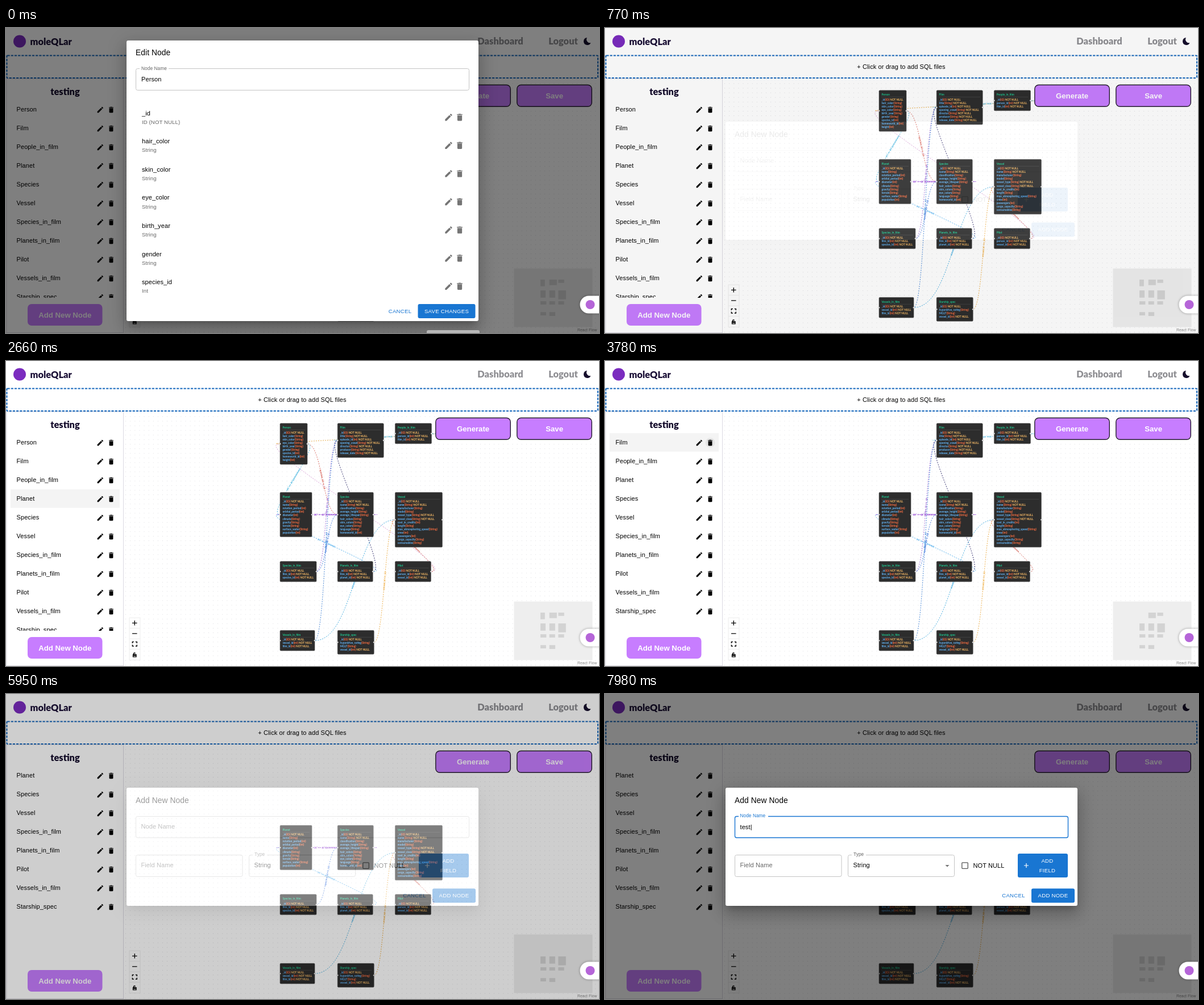
Animation of 1043 by 537 pixels, one loop 8 s. Source, as an HTML page:

```html
<!DOCTYPE html>
<html lang="en">
<head>
<meta charset="utf-8">
<title>Schema editor</title>
<style>
  html, body { margin: 0; width: 100%; height: 100%; overflow: hidden; background: #fff; }
  svg, .modal, .backdrop { position: absolute; left: 0; top: 0; width: 1043px; height: 537px; }
  svg { font: 11px "Liberation Sans", Arial, sans-serif; letter-spacing: .1px; }
  .backdrop { background: rgba(0, 0, 0, .5); }
  .paper { position: absolute; left: 212px; width: 619px; background: #fff; border-radius: 3px;
    box-shadow: 0 8px 10px -5px rgba(0,0,0,.2), 0 16px 26px 2px rgba(0,0,0,.14), 0 6px 32px 6px rgba(0,0,0,.12); }
  .brand { font: 900 16.4px Lato, sans-serif; letter-spacing: 0; }
  .bold { font-weight: 700; font-size: 13.2px; letter-spacing: 0; text-anchor: middle; fill: #fff; }
  .title { font-size: 13.75px; }
  .small { font-size: 9.6px; fill: #666; }
  .label { font-size: 8.25px; fill: #666; }
  .caps { font-size: 9.6px; letter-spacing: .27px; text-anchor: middle; }
  .graph { font: 700 4.75px Lato, sans-serif; letter-spacing: 0; }
  .edge { fill: none; stroke-width: 1; stroke-dasharray: 2.025; }
  .box { fill: none; stroke: #c4c4c4; }
</style>
</head>
<body>
<svg id="base"></svg>
<div class="modal" id="edit"><div class="backdrop"></div><div class="paper" style="top:22px;height:494px"></div><svg></svg></div>
<div class="modal" id="add"><div class="backdrop"></div><div class="paper" style="top:165px;height:208px"></div><svg></svg></div>
<svg id="badge"></svg>
<script>
const LOOP = 8000, STEP = 70, ZOOM = .405;
const BLUE = '#1976d2', VIOLET = '#c77dff';
const $ = selector => document.querySelector(selector);

const text = (x, y, s, cls = '', more = '') => `<text x="${x}" y="${y}" class="${cls}" ${more}>${s}</text>`;
const rect = (x, y, w, h, more = '') => `<rect x="${x}" y="${y}" width="${w}" height="${h}" ${more}/>`;
const icon = (d, x, y, size) => `<path d="${d}" transform="translate(${x - size / 2} ${y - size / 2}) scale(${size / 24})"/>`;
const PENCIL = 'M3 17.25V21h3.75L17.81 9.94l-3.75-3.75zM20.71 7.04a1 1 0 0 0 0-1.41l-2.34-2.34a1 1 0 0 0-1.41 0l-1.83 1.83 3.75 3.75z';
const TRASH = 'M6 19c0 1.1.9 2 2 2h8c1.1 0 2-.9 2-2V7H6zM19 4h-3.5l-1-1h-5l-1 1H5v2h14z';
const tools = (x, y, size, gap) => icon(PENCIL, x, y, size) + icon(TRASH, x + gap, y, size);

// Fields: "#" marks Int, "!" marks NOT NULL, otherwise a nullable String.
const nodes = [
  ['Person', 48, 'hair_color skin_color eye_color birth_year gender species_id# homeworld_id# height#'],
  ['Film', 81, 'title! episode_id#! opening_crawl! director! producer! release_date!'],
  ['People_in_film', 64, 'person_id#! film_id#!'],
  ['Planet', 56, 'name rotation_period# orbital_period# diameter# climate gravity terrain surface_water population#'],
  ['Species', 63, 'name! classification average_height average_lifespan hair_colors skin_colors eye_colors language homeworld_id#'],
  ['Vessel', 83, 'name! manufacturer model vessel_type! vessel_class! cost_in_credits# length max_atmosphering_speed crew# passengers# cargo_capacity consumables'],
  ['Species_in_film', 64, 'film_id#! species_id#!'],
  ['Planets_in_film', 62, 'film_id#! planet_id#!'],
  ['Pilot', 63, 'person_id#! vessel_id#!'],
  ['Vessels_in_film', 61, 'vessel_id#! film_id#!'],
  ['Starship_spec', 64, 'hyperdrive_rating MGLT vessel_id#!']
].map(([name, w, list], i) => {
  const fields = ['_id!', ...list.split(' ')];
  return { name, w, fields, x: 482 + i % 3 * 101.2, y: 109.8 + Math.floor(i / 3) * 121.5, h: 17.6 + 6.07 * fields.length };
});
const byName = Object.fromEntries(nodes.map(n => [n.name, n]));

const edges = [
  ['Person', 'Species', '#d9695f', 'species_id'],
  ['Person', 'Planet', '#4db8e0', 'homeworld_id'],
  ['People_in_film', 'Person', '#e9b04f', 'person_id'],
  ['People_in_film', 'Film', '#6cc3e6', 'film_id'],
  ['Species', 'Planet', '#9b51d6', 'homeworld_id'],
  ['Species_in_film', 'Film', '#a274d8', 'film_id'],
  ['Species_in_film', 'Species', '#4a7fe0', 'species_id'],
  ['Planets_in_film', 'Film', '#34306e', 'film_id'],
  ['Planets_in_film', 'Planet', '#5db4ee', 'planet_id'],
  ['Pilot', 'Person', '#d9a0d6', 'person_id'],
  ['Pilot', 'Vessel', '#d4665c', 'vessel_id'],
  ['Vessels_in_film', 'Film', '#4c8ad8', 'film_id'],
  ['Vessels_in_film', 'Vessel', '#45ade0', 'vessel_id'],
  ['Starship_spec', 'Vessel', '#efb04a', 'vessel_id']
];

function edgeSvg([from, to, color, field], i) {
  const a = byName[from], b = byName[to];
  const x1 = a.x + a.w, y1 = a.y + a.h / 2, x2 = b.x, y2 = b.y + b.h / 2, d = x2 - x1;
  const bend = d >= 0 ? d / 2 : 6.25 * Math.sqrt(-d * ZOOM);
  return `<path id="e${i}" class="edge" stroke="${color}" d="M${x1} ${y1}C${x1 + bend} ${y1} ${x2 - bend} ${y2} ${x2} ${y2}"/>
    <text fill="${color}" dy="1.5" text-anchor="middle"><textPath href="#e${i}" startOffset="50%">${field} → _id</textPath></text>`;
}

function fieldSvg(field, x, y) {
  const name = field.replace(/[#!]/g, '');
  const type = name === '_id' ? 'ID' : field.includes('#') ? 'Int' : 'String';
  const required = field.includes('!') ? '<tspan fill="#ffc069"> NOT NULL</tspan>' : '';
  return text(x, y, `${name}<tspan fill="#ff7043">(${type})</tspan>${required}`, '', 'fill="#64b5f6"');
}

function nodeSvg({ name, x, y, w, h, fields }) {
  const dot = cx => `<circle cx="${cx}" cy="${y + h / 2}" r="1.3" fill="#fff" stroke="#777" stroke-width=".4"/>`;
  return rect(x, y, w, h, 'rx="1.5" fill="#2d2d2d" stroke="#555" stroke-width=".6"') +
    text(x + 4.4, y + 9.2, name, '', 'fill="#1fc58e"') +
    rect(x + 4, y + 11.6, w - 8, .5, 'fill="#555"') +
    fields.map((f, i) => fieldSvg(f, x + 4.4, y + 17.9 + i * 6.07)).join('') + dot(x) + dot(x + w);
}

const miniSvg = n => rect(940 + (n.x - 482) * .155, 443 + (n.y - 110) * .157, n.w * .162, n.h * .162, 'fill="#d3d3d3"');
const rowSvg = (n, i) => text(18.5, 147.3 + i * 33, n.name) + tools(165.8, 144 + i * 33, 13.75, 19.2);
const button = (x, y, s, border) => rect(x, y, 131.5, 38, `rx="7" fill="${VIOLET}" ${border}`) + text(x + 65.8, y + 23.5, s, 'bold');

const controls = [
  'M222 461.3h8.5M226.3 457v8.5', 'M222 479.8h8.5',
  'M222.3 497v-2.5h2.5M227.8 494.5h2.5v2.5M230.3 499.500v2.5h-2.5M224.8 502h-2.500v-2.500',
  'M223.500 517h5.500v3.800h-5.500zM224.500 517v-2q1.500-2 3 0M223.500 518.500h5.500'
];

$('#base').innerHTML = `
  <defs>
    <pattern id="dots" x="482" y="110" width="8.1" height="8.1" patternUnits="userSpaceOnUse"><circle cx="4" cy="4" r=".5" fill="#cfcfd4"/></pattern>
    <clipPath id="listClip">${rect(0, 120, 206, 355)}</clipPath>
  </defs>
  ${rect(0, 0, 1043, 537, 'fill="#fff"')}${rect(207, 89, 836, 448, 'fill="url(#dots)"')}
  <g id="graph" class="graph"></g>
  ${rect(1, 89.500, 205.500, 447, 'fill="#fff" stroke="#dcdae2"')}
  <circle cx="24" cy="23.500" r="11" fill="#7b2cbf"/>
  ${text(42.500, 29.500, 'moleQLar', 'brand', 'fill="#1d1238"')}
  ${text(869.500, 29.200, 'Dashboard', 'brand', 'fill="#8e8e92" text-anchor="middle"')}
  ${text(980, 29.200, 'Logout', 'brand', 'fill="#8e8e92" text-anchor="middle"')}
  <path d="M1022 17a6.500 6.500 0 1 0 6.500 9a6 6 0 0 1-6.500-9z" fill="#150c2c"/>
  ${rect(1.500, 48.500, 1039.500, 39.500, 'rx="1" fill="#fff" stroke="#1769bd" stroke-width="2" stroke-dasharray="4.200 2"')}
  ${text(521, 71.800, '+ Click or drag to add SQL files', '', 'text-anchor="middle"')}
  ${text(104, 118, 'testing', 'brand', 'fill="#150c2c" text-anchor="middle"')}
  <g id="hover">${rect(8, 127, 192, 32.500, 'fill="#f4f4f4"')}<circle id="trashHover" cx="185" cy="143.800" r="8.500" fill="#e6e6e6"/></g>
  <g id="list" clip-path="url(#listClip)"></g>
  ${button(38, 486, 'Add New Node', '')}
  ${button(755.800, 100.200, 'Generate', 'stroke="#26202e" stroke-width="1.400"')}
  ${button(898.800, 100.200, 'Save', 'stroke="#26202e" stroke-width="1.400"')}
  ${rect(217, 452, 19, 74.500, 'fill="#fefefe" stroke="#eee"')}
  <path d="M217 470.500h19M217 489h19M217 507.500h19" stroke="#eee"/>
  <path d="${controls.join('')}" fill="none" stroke="#000" stroke-width="1.300"/>
  ${rect(893.500, 423.500, 138, 103, 'fill="#eee"')}
  <g id="mini"></g>
  ${text(1039.500, 533.500, 'React Flow', '', 'font-size="6.900" letter-spacing="0" fill="#888" text-anchor="end"')}`;

$('#edit svg').innerHTML = text(228, 48.200, 'Edit Node', 'title') +
  rect(228.500, 71.500, 586, 38, 'rx="3" class="box"') + rect(235, 69, 51, 5, 'fill="#fff"') +
  text(238, 73.600, 'Node Name', 'label') + text(238, 94.300, 'Person') +
  nodes[0].fields.slice(0, 7).map((f, i) => {
    const y = 153.500 + i * 49.600;
    const type = i === 0 ? 'ID (NOT NULL)' : f.includes('#') ? 'Int' : 'String';
    return text(239, y, f.replace(/[#!]/g, '')) + text(239, y + 15.200, type, 'small') +
      `<g fill="#757575">${tools(778.500, y + 3.700, 16.500, 19.500)}</g>`;
  }).join('') +
  text(693, 502, 'CANCEL', 'caps', `fill="${BLUE}"`) +
  rect(724.500, 486, 101, 25, `rx="3" fill="${BLUE}"`) + text(775, 502, 'SAVE CHANGES', 'caps', 'fill="#fff"') +
  rect(740, 532, 93, 8, 'rx="3" fill="#b8b8b8"');

$('#add svg').innerHTML = text(228, 191.500, 'Add New Node', 'title') +
  rect(228.500, 215.500, 586, 37.500, 'id="nameBox" rx="3" class="box"') +
  rect(235, 213, 52, 5, 'id="notch" fill="#fff"') +
  '<text id="nameLabel">Node Name</text>' + text(237.500, 237.500, '', '', 'id="typed"') +
  rect(228.500, 283.500, 187.500, 38, 'rx="3" class="box"') + text(237.500, 305.300, 'Field Name', '', 'fill="#666"') +
  rect(427.500, 283.500, 187, 38, 'rx="3" class="box"') + rect(434, 281, 25, 5, 'fill="#fff"') +
  text(437, 285.300, 'Type', 'label') + text(436.500, 305.300, 'String') +
  '<path d="M598.500 301h7l-3.500 3.500z" fill="#757575"/>' +
  rect(627.800, 296.800, 10.500, 10.500, 'rx="1" fill="none" stroke="#555" stroke-width="1.300"') +
  text(647.500, 305.800, 'NOT NULL') +
  rect(726, 281, 88, 42, `rx="3" fill="${BLUE}"`) +
  '<path d="M737 302h8M741 298v8" stroke="#fff" stroke-width="1.200"/>' +
  text(778, 296.700, 'ADD', 'caps', 'fill="#fff"') + text(778, 313.700, 'FIELD', 'caps', 'fill="#fff"') +
  text(718.500, 358.200, 'CANCEL', 'caps', `fill="${BLUE}"`) +
  rect(750, 342.500, 76, 25, `rx="3" fill="${BLUE}"`) + text(788, 358.200, 'ADD NODE', 'caps', 'fill="#fff"');

$('#badge').innerHTML = `<g style="filter:drop-shadow(0 0 2px rgba(0,0,0,.35))"><path d="M1050 471.500h-25a15.500 15.500 0 0 0 0 31h25z" fill="#fff"/></g>
  <circle cx="1027.500" cy="487" r="8" fill="#b565d8"/>`;
$('#badge').style.pointerEvents = 'none';

const removals = { Person: 3640, People_in_film: 4130, Film: 4970 };
// [start, row, pointer on the trash icon]
const hovers = [[0, -1], [2030, 5, 1], [2170, 4], [2450, 3], [3430, 0, 1], [3920, 1, 1], [4270, 0, 1], [5250, -1]];
const keys = [7560, 7700, 7840, 7910];

const ramp = (t, start, length) => {
  const p = Math.min(1, Math.max(0, (t - start) / length));
  return p * p * (3 - 2 * p);
};

let shownCount = -1;
function showNodes(t) {
  const alive = n => !(t >= removals[n.name]);
  const live = nodes.filter(alive);
  if (live.length === shownCount) return;
  shownCount = live.length;
  const links = edges.filter(([a, b]) => alive(byName[a]) && alive(byName[b]));
  $('#graph').innerHTML = links.map(edgeSvg).join('') + live.map(nodeSvg).join('');
  $('#list').innerHTML = live.map(rowSvg).join('');
  $('#mini').innerHTML = live.map(miniSvg).join('');
}

function setOpacity(selector, value) {
  $(selector).style.opacity = value;
  $(selector).style.visibility = value ? 'visible' : 'hidden';
}

function draw(t) {
  showNodes(t);
  $('#graph').setAttribute('stroke-dashoffset', -(t / 500 * 10 * ZOOM) % 4.05);

  const [, row, onTrash] = hovers.findLast(h => t >= h[0]);
  $('#hover').setAttribute('transform', `translate(0 ${row * 33})`);
  $('#hover').style.display = row < 0 ? 'none' : '';
  $('#trashHover').style.display = onTrash ? '' : 'none';

  setOpacity('#edit', 1 - ramp(t, 140, 195));
  setOpacity('#add', ramp(t, 340, 225) - ramp(t, 608, 195) + ramp(t, 5855, 225));

  const focused = t >= 7140, lift = ramp(t, 7140, 200);
  $('#nameBox').style.cssText = focused ? `stroke:${BLUE};stroke-width:1.4` : '';
  $('#notch').style.display = focused ? '' : 'none';
  const label = $('#nameLabel');
  label.setAttribute('transform', `translate(237.5 ${237 - 20 * lift}) scale(${1 - .25 * lift})`);
  label.setAttribute('fill', focused ? BLUE : '#666');
  $('#typed').textContent = focused ? 'test'.slice(0, keys.filter(k => t >= k).length) + '|' : '';
}

function tick() {
  const t = Math.floor(performance.now() % LOOP / STEP) * STEP;
  draw(t < 140 ? 0 : t);
  requestAnimationFrame(tick);
}
tick();
</script>
</body>
</html>
```
